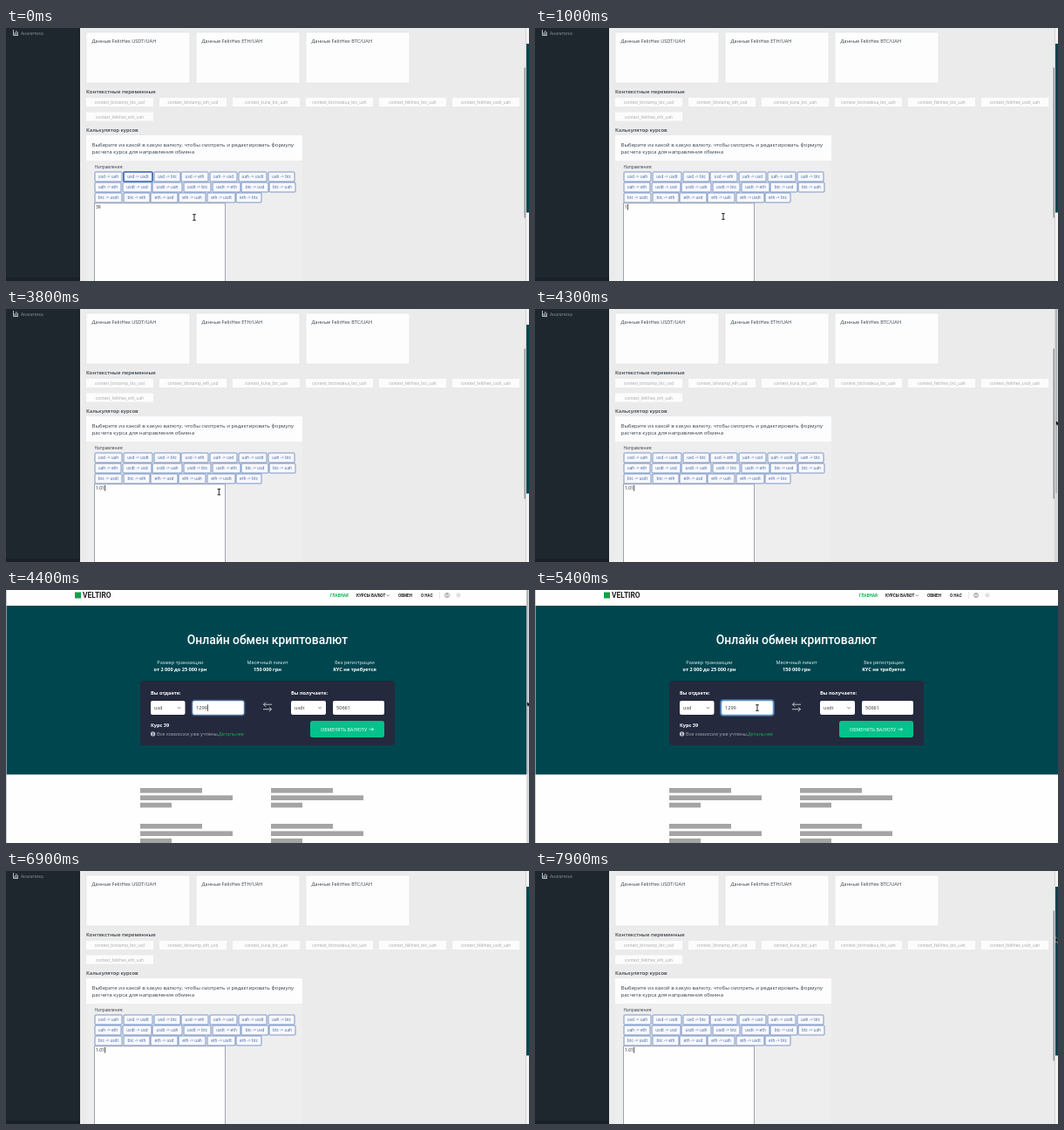
An HTML page that plays this animation: 600 by 290 pixels, repeating every 8 s.

```html
<!DOCTYPE html>
<html lang="ru">
<head>
<meta charset="utf-8">
<title>Калькулятор курсов</title>
<style>
  html, body { margin: 0; width: 100%; height: 100%; overflow: hidden; background: #fff; }
  svg { display: block; width: 100vw; height: 100vh; }
  text { font-family: "Open Sans", "Noto Sans", sans-serif; white-space: pre; }
  .nav { font-family: Roboto, sans-serif; }
</style>
</head>
<body>
<svg id="stage" viewBox="0 0 600 290"></svg>
<script>
const LOOP = 8000, STEP = 100;
const stage = document.getElementById('stage');

const rect = (x, y, w, h, fill, more = '') =>
  `<rect x="${x}" y="${y}" width="${w}" height="${h}" fill="${fill}" ${more}/>`;
const text = (x, y, str, size, fill, more = '') =>
  `<text x="${x}" y="${y}" font-size="${size}" fill="${fill}" ${more}>${str.replace(/>/g, '&gt;')}</text>`;
const line = (d, stroke, width = 0.8, more = '') =>
  `<path d="${d}" fill="none" stroke="${stroke}" stroke-width="${width}" ${more}/>`;
const group = (id, body) => `<g id="${id}">${body}</g>`;
const MID = 'text-anchor="middle"', MEDIUM = 'font-weight="500"', SEMI = 'font-weight="600"', BOLD = 'font-weight="700"';
const TEAL = '#00464f', INK = '#34404d';

function adminPage() {
  const cards = ['USDT', 'ETH', 'BTC'].map((coin, i) => {
    const x = 92 + 126 * i;
    return rect(x, 5, 119, 58, '#fdfdfd', 'stroke="#e0dfe0" stroke-width=".6"') +
      text(x + 6.5, 17, `Данные FelitHex ${coin}/UAH`, 5.65, INK, MEDIUM);
  });
  const chips = ['bitstamp_btc_usd', 'bitstamp_eth_usd', 'kuna_btc_uah', 'btctradeua_btc_uah',
    'felithex_btc_uah', 'felithex_usdt_uah', 'felithex_eth_uah'].map((name, i) => {
    const x = 92 + 84 * (i % 6), y = i < 6 ? 80 : 96.5;
    return rect(x, y, 77, 10, '#fcfcfc') +
      text(x + 38.5, y + 7.2, 'context_' + name, 4.75, '#a4a7ac', MID);
  });

  // Each entry: label, left edge, right edge
  const rows = [
    [['usd -> uah', 102, 133], ['usd -> usdt', 135, 168], ['usd -> btc', 170, 200], ['usd -> eth', 201, 232],
     ['uah -> usd', 234, 265], ['uah -> usdt', 267, 299], ['uah -> btc', 301, 331]],
    [['uah -> eth', 102, 132], ['usdt -> usd', 134, 167], ['usdt -> uah', 168, 202], ['usdt -> btc', 204, 235],
     ['usdt -> eth', 237, 269], ['btc -> usd', 270, 301], ['btc -> uah', 302, 332]],
    [['btc -> usdt', 102, 133], ['btc -> eth', 135, 165], ['eth -> usd', 166, 197], ['eth -> uah', 198, 229],
     ['eth -> usdt', 231, 263], ['eth -> btc', 264, 293]]
  ];
  const buttons = rows.flatMap((row, r) => row.map(([label, left, right]) => {
    const y = 165 + 12 * r;
    return rect(left, y, right - left, 11, '#f8f8fb', 'rx=".8" stroke="#5c7fbd" stroke-width=".8"') +
      text((left + right) / 2, y + 7.2, label, 4.75, '#3e63a8', MID);
  }));

  return rect(0, 0, 600, 290, '#ecebeb') +
    rect(0, 0, 85, 290, '#1f272e') + rect(0, 286, 85, 4, '#192027') +
    line('M8.5 2V8.5H14M10 8V5M11.8 8V3M13.4 8V4.5', '#c3c7cb', 0.9) +
    text(17, 7.8, 'Аналитика', 4.95, '#8d949b') +
    cards.join('') +
    text(92, 75, 'Контекстные переменные', 6, INK, SEMI) + chips.join('') +
    text(92, 118.6, 'Калькулятор курсов', 5.9, INK, SEMI) +
    rect(92, 123, 248, 167, '#efeeee') + rect(92, 123, 248, 29, '#fdfdfd') +
    text(98.5, 136, 'Выберите из какой в какую валюту, чтобы смотреть и редактировать формулу', 6.05, INK, MEDIUM) +
    text(98.5, 143.6, 'расчета курса для направления обмена', 6.05, INK, MEDIUM) +
    text(101.5, 160.8, 'Направления:', 4.8, INK) + buttons.join('') +
    group('ring', rect(135, 165, 33, 11, 'none', 'rx="1" stroke="#4b70b8" stroke-width="1.7"')) +
    rect(101.5, 200.8, 150, 100, '#fefefe', 'stroke="#8790a0" stroke-width=".8"') +
    text(103, 207, '', 5, '#222', 'id="formula"') +
    group('caret', rect(0, 202, 0.8, 6.5, '#222')) +
    rect(596.5, 0, 3.5, 290, '#f3f3f3') + rect(597, 18, 3, 193.5, TEAL) +
    line('M596.4 0V290', '#c4c6c8', 0.7) +
    group('scrollbar', line('M595.2 45.5V217.5', '#7b7f83', 1.2));
}

function sitePage() {
  const chevron = (x, y, color) => line(`M${x - 1.6} ${y - 0.8}l1.6 1.6 1.6-1.6`, color, 0.7);
  const field = (x, w, value) => rect(x, 127, w, 16, '#fff', 'rx="2"') + text(x + 4, 137, value, 5.6, '#333');
  const nav = (x, str, color = '#1d1d1d') => text(x, 8, str, 4.6, color, `class="nav" ${BOLD}`);
  const facts = [['Размер транзакции', 'от 2 000 до 25 000 грн'], ['Месячный лимит', '150 000 грн'],
    ['Без регистрации', 'KYC не требуется']].map(([name, value], i) =>
    text(200 + 100 * i, 84.5, name, 5.6, '#e9f0f1', MID) +
    text(200 + 100 * i, 93, value, 5.6, '#fff', `${MID} ${BOLD}`));
  const bars = [154, 304].flatMap(x => [227, 268].flatMap(y =>
    [71, 106, 36].map((w, i) => rect(x, y + 8.4 * i, w, 5.6, '#a5a4a4'))));

  return rect(0, 0, 600, 290, '#fefefe') + rect(0, 18, 600, 193.5, TEAL) +
    line('M.4 0V290', '#b9bcbe', 0.8) +
    rect(79, 2.5, 7, 7, '#12a04a') + text(88, 9.3, 'VELTIRO', 8.4, '#222', `class="nav" ${BOLD}`) +
    nav(372, 'ГЛАВНАЯ', '#10b04c') + nav(402, 'КУРСЫ ВАЛЮТ') + chevron(438.3, 6.2, '#555') +
    nav(450, 'ОБМЕН') + nav(476, 'О НАС') + line('M497.5 2V10', '#d5d5d5', 0.6) +
    '<g fill="none" stroke="#777" stroke-width=".6"><circle cx="506" cy="6" r="2.6"/><circle cx="506" cy="5.2" r=".9"/>' +
    '<path d="M504.3 7.9q1.7-1.6 3.4 0"/></g>' +
    '<g fill="none" stroke="#c4c4c4"><circle cx="519" cy="6" r="2.2" stroke-dasharray="1 .73"/><circle cx="519" cy="6" r="1.2" stroke-width=".7"/></g>' +
    text(300, 62, 'Онлайн обмен криптовалют', 13.85, '#fff', `class="nav" ${MID} ${MEDIUM}`) +
    facts.join('') +
    rect(154, 104, 292, 74, '#25293d', 'rx="4"') +
    text(166, 119.6, 'Вы отдаете:', 5.6, '#fff', BOLD) + text(327, 119.6, 'Вы получаете:', 5.6, '#fff', BOLD) +
    field(166, 39.5, 'usd') + chevron(198.5, 135, '#444') +
    group('glow', rect(213.2, 126.2, 60.6, 17.6, 'none', 'rx="2.8" stroke="#5f9de0" stroke-width="2" opacity=".65"')) +
    field(214, 59, '1299') +
    rect(214, 127, 59, 16, 'none', 'rx="2" stroke="#8fb9ea" stroke-width=".8"') +
    group('amountCaret', rect(230.9, 131.3, 0.8, 7.5, '#222')) +
    field(327, 40, 'usdt') + chevron(360, 135, '#444') + field(375, 59, '50661') +
    line('M305 131.2H295.5M298 128.7l-2.5 2.5 2.5 2.5M295 136.7H304.5M302 134.2l2.5 2.5-2.5 2.5', '#e4e6ea', 0.8) +
    text(166, 156.5, 'Курс 39', 5.6, '#fff', BOLD) +
    '<circle cx="168.6" cy="164.9" r="2.7" fill="#b9bcc6"/>' + line('M168.6 164.4V166.6M168.6 163V163.7', '#25293d') +
    text(173, 167, 'Все комиссии уже учтены.', 5.6, '#a9adb8') + text(244, 167, 'Детальнее', 5.6, '#16b052') +
    rect(349, 150, 85, 19, '#03c28b', 'rx="2.5"') +
    text(361, 161.7, 'ОБМЕНЯТЬ ВАЛЮТУ', 5.4, '#fff') +
    line('M416.5 159.7H421.6M419.7 157.8l1.9 1.9-1.9 1.9', '#fff', 0.7) + bars.join('');
}

stage.innerHTML = group('admin', adminPage()) + group('site', sitePage()) +
  group('edge', rect(597, 0, 3, 290, '#d6d8da') + line('M598 0V211', '#85898c', 0.8)) +
  group('mouse',
    group('beam', line('M-1.8-3.3H1.8M-1.8 3.3H1.8M0-3.3V3.3', '#fff', 1.8) +
      line('M-1.8-3.3H1.8M-1.8 3.3H1.8M0-3.3V3.3', '#111', 0.9)) +
    group('arrow', '<path d="M-1-2.5V4L.6 2.6 1.7 4.8 2.7 4.3 1.7 2.2H3.6Z" fill="#111" stroke="#fff" stroke-width=".4"/>'));

const parts = Object.fromEntries([...stage.querySelectorAll('[id]')].map(el => [el.id, el]));
const show = (id, on) => parts[id].setAttribute('opacity', Number(on));
const within = (t, from, to) => t >= from && t < to;
const clamp = v => Math.max(0, Math.min(1, v));

// Time, x, y
const mousePath = [[0, 216, 217], [200, 216, 216], [3700, 216, 216], [4300, 598.5, 130], [4600, 598.5, 130],
  [5400, 255, 135], [5900, 255, 135], [6800, 592, -9], [7300, 500, -9], [7900, 598, 78]];
// Time, formula text
const typing = [[0, '39'], [700, '3'], [900, ''], [1000, '1'], [1400, '1.'], [1800, '1.0'], [2100, '1.01']];

function mouseAt(t) {
  const next = mousePath.findIndex(([time]) => time > t);
  if (next < 0) return mousePath.at(-1).slice(1);
  const [t0, x0, y0] = mousePath[next - 1], [t1, x1, y1] = mousePath[next];
  const u = (t - t0) / (t1 - t0), k = u * u * (3 - 2 * u);
  return [x0 + (x1 - x0) * k, y0 + (y1 - y0) * k];
}

function render(t) {
  const onSite = within(t, 4400, 6900);
  parts.admin.style.display = onSite ? 'none' : '';
  parts.site.style.display = onSite ? '' : 'none';

  const value = typing.findLast(([time]) => time <= t)[1];
  parts.formula.textContent = value;
  const width = [...value].reduce((sum, c) => sum + (c === '.' ? 1.33 : 2.86), 0);
  parts.caret.setAttribute('transform', `translate(${103.2 + width})`);
  show('caret', t >= 300 && !within(t, 2200, 2800));
  show('ring', clamp((300 - t) / 200));
  show('scrollbar', t < 3800 ? clamp((1900 - t) / 500) : t < 4400 || t >= 7400);
  show('edge', within(t, 4300, 4700));
  show('glow', 0.3 + 0.7 * clamp((t - 5200) / 200));
  show('amountCaret', !within(t, 5100, 5600));

  const [x, y] = mouseAt(t);
  const overField = onSite ? x > 214 && x < 273 && y > 127 && y < 143 : x < 251 && y > 201;
  parts.mouse.setAttribute('transform', `translate(${x} ${y})`);
  show('beam', overField);
  show('arrow', !overField);
}

const start = performance.now();
function tick() {
  const t = (performance.now() - start) % LOOP;
  render(Math.floor(t / STEP) * STEP);
  requestAnimationFrame(tick);
}
tick();
</script>
</body>
</html>
```
